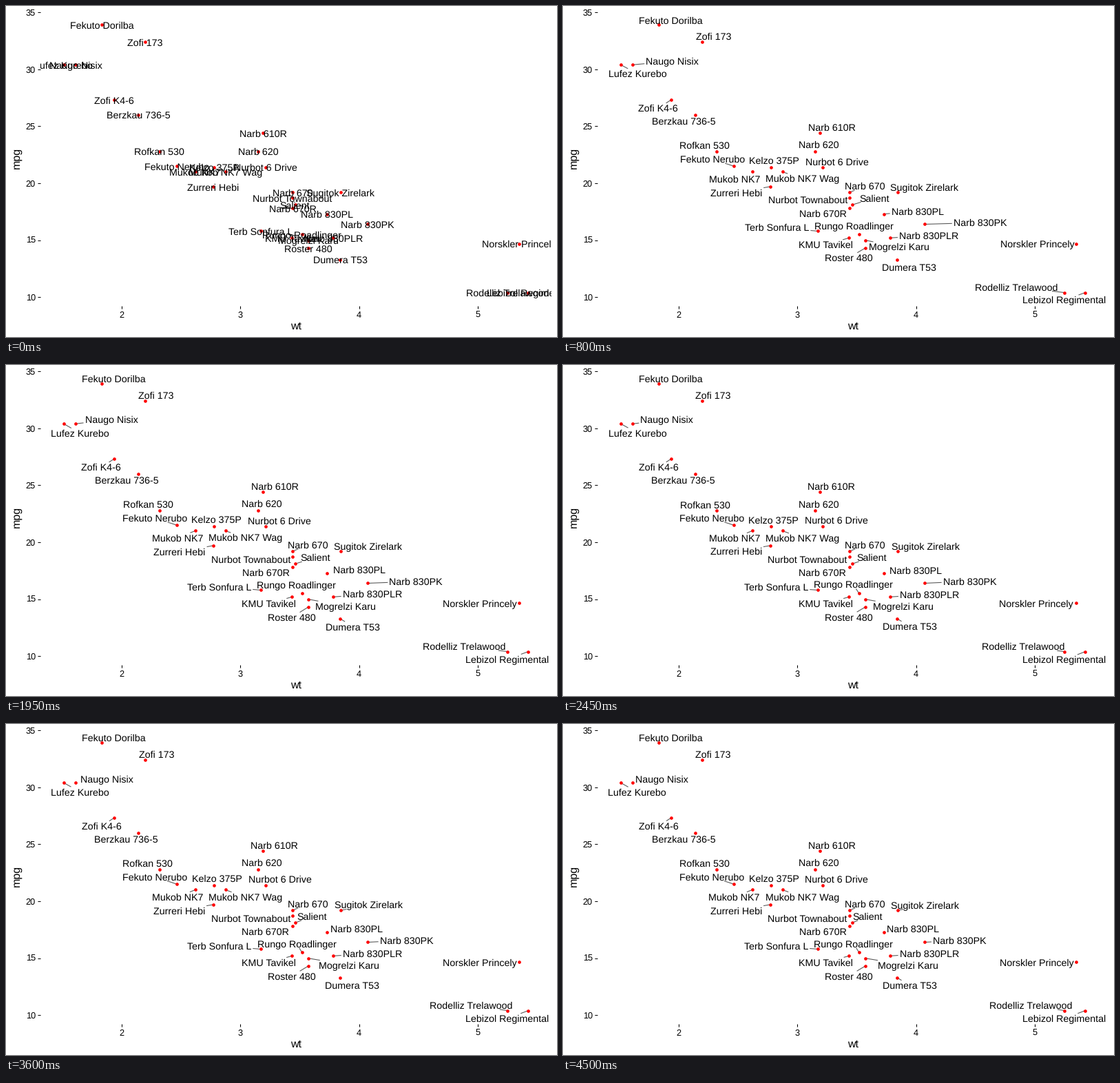
A matplotlib script that plays this animation: 800x480 px, repeating every 5.05 s.

```python
import numpy as np
import matplotlib as mpl
import matplotlib.pyplot as plt
from matplotlib.animation import FuncAnimation
from matplotlib.collections import LineCollection

W, H, DPI = 800, 480, 72
FRAMES, INTERVAL, LAST_MOVE = 101, 50, 90
LEFT, RIGHT, TOP, BOTTOM = 50, 792, 8, 435   # panel edges in pixels

mpl.rcParams.update({"font.family": "Liberation Sans", "text.hinting": "none"})

# name, weight, mileage, resting label offset from the point (right, down)
CARS = [
    ("Fekuto Dorilba", 1.835, 33.9, 17, -8),
    ("Zofi 173", 2.2, 32.4, 16, -9),
    ("Naugo Nisix", 1.615, 30.4, 42, -6),
    ("Lufez Kurebo", 1.513, 30.4, 24, 13),
    ("Zofi K4-6", 1.935, 27.3, -18, 11),
    ("Berzkau 736-5", 2.14, 26, -17, 9),
    ("Narb 610R", 3.19, 24.4, 17, -9),
    ("Rofkan 530", 2.32, 22.8, -17, -9),
    ("Narb 620", 3.15, 22.8, 5, -10),
    ("Fekuto Nerubo", 2.465, 21.5, -32, -11),
    ("Kelzo 375P", 2.78, 21.4, 4, -10),
    ("Nurbot 6 Drive", 3.215, 21.4, 20, -9),
    ("Mukob NK7", 2.62, 21, -26, 10),
    ("Mukob NK7 Wag", 2.875, 21, 29, 10),
    ("Zurreri Hebi", 2.77, 19.7, -49, 8),
    ("Narb 670", 3.44, 19.2, 22, -10),
    ("Sugitok Zirelark", 3.845, 19.2, 40, -8),
    ("Nurbot Townabout", 3.44, 18.7, -61, 3),
    ("Salient", 3.46, 18.1, 23, -10),
    ("Narb 670R", 3.44, 17.8, -39, 7),
    ("Narb 830PL", 3.73, 17.3, 42, -5),
    ("Narb 830PK", 4.07, 16.4, 51, -3),
    ("Rungo Roadlinger", 3.52, 15.5, -8, -13),
    ("Terb Sonfura L", 3.17, 15.8, -60, -5),
    ("Narb 830PLR", 3.78, 15.2, 57, -4),
    ("KMU Tavikel", 3.435, 15.2, -34, 9),
    ("Mogrelzi Karu", 3.57, 15, 62, 10),
    ("Roster 480", 3.57, 14.3, -24, 14),
    ("Dumera T53", 3.84, 13.3, 18, 11),
    ("Norskler Princely", 5.345, 14.7, -57, 1),
    ("Rodelliz Trelawood", 5.25, 10.4, -49, -8),
    ("Lebizol Regimental", 5.424, 10.4, -30, 11),
]
# Sideways overshoot of the labels that take longest to come to rest
OVERSHOOT = {"Naugo Nisix": 20, "Narb 830PK": 38, "Salient": 13,
             "Narb 830PL": 9, "Mogrelzi Karu": -16, "Rodelliz Trelawood": -28}

names, wt, mpg, right, down = zip(*CARS)


def scale(values, data, start, end):
    """Map values to pixels, with a 5 % margin around the data."""
    lo, hi = min(data), max(data)
    pad = 0.05 * (hi - lo)
    share = (np.asarray(values) - lo + pad) / (hi - lo + 2 * pad)
    return start + share * (end - start)


def to_x(values):
    return scale(values, wt, LEFT, RIGHT)


def to_y(values):
    return scale(values, mpg, BOTTOM, TOP)


points = np.column_stack([to_x(wt), to_y(mpg)])
rest = np.column_stack([right, down])
overshoot = np.array([(OVERSHOOT.get(name, 0), 0) for name in names])
rng = np.random.default_rng(4)
speed = rng.uniform(0.2, 0.9, points.shape)
phase = rng.uniform(0, 2 * np.pi, points.shape)

fig = plt.figure(figsize=(W / DPI, H / DPI), dpi=DPI, facecolor="white")
ax = fig.add_axes([LEFT / W, 1 - BOTTOM / H,
                   (RIGHT - LEFT) / W, (BOTTOM - TOP) / H])
ax.set_xlim(LEFT, RIGHT)
ax.set_ylim(BOTTOM, TOP)
ax.spines[:].set_visible(False)
x_ticks, y_ticks = range(2, 6), range(10, 36, 5)
ax.set_xticks(to_x(x_ticks), [str(v) for v in x_ticks])
ax.set_yticks(to_y(y_ticks), [str(v) for v in y_ticks])
ax.tick_params(length=4, width=1.07, pad=3.2, labelsize=12.8)
fig.text(421 / W, 1 - 469 / H, "wt", size=16, ha="center", va="baseline")
fig.text(20 / W, 1 - 220.5 / H, "mpg", size=16, rotation=90,
         rotation_mode="anchor", ha="center", va="baseline")

ax.scatter(*points.T, s=4.7 ** 2, c="red", linewidths=0, zorder=2)
leaders = LineCollection([], colors="#555555", linewidths=1.07, zorder=1)
ax.add_collection(leaders, autolim=False)
labels = [ax.text(x, y, name, size=14.2, ha="center", va="baseline",
                  clip_on=True, zorder=3)
          for name, (x, y) in zip(names, points)]
half = np.array([t.get_window_extent().width / 2 for t in labels]) * DPI / fig.dpi


def centres(i):
    """Label centres: a fast spread, then a slow, fading drift."""
    i = min(i, LAST_MOVE)
    spread = 1 - np.exp(-i / 3.5)
    left = 1 - i / LAST_MOVE
    wobble = 0.8 * left * np.sin(speed * i + phase)
    pos = points + (0, 0.4) + spread * (rest + overshoot * left ** 1.2 + wobble)
    if i > 0:   # labels stay inside the panel once the layout starts
        pos[:, 0] = np.clip(pos[:, 0], LEFT + 2 + half, RIGHT - 3.5 - half)
    return pos


def leader(point, centre, half_width):
    """Line from a point to the edge of its label box, if long enough."""
    dx, dy = centre - point
    reach_y = 7.3 if dy > 0 else 6
    inside = min((half_width + 2) / max(abs(dx), 1e-6),
                 reach_y / max(abs(dy), 1e-6))
    part = 1 - inside
    if part <= 0 or part * np.hypot(dx, dy) < 7.5:
        return None
    return [point, point + part * np.array([dx, dy])]


def draw(i):
    pos = centres(i)
    for text, (x, y) in zip(labels, pos):
        text.set_position((x, y + 5))
    lines = (leader(*item) for item in zip(points, pos, half))
    leaders.set_segments([line for line in lines if line])
    return [leaders, *labels]


anim = FuncAnimation(fig, draw, frames=FRAMES, interval=INTERVAL,
                     repeat=True, repeat_delay=0, blit=False)
plt.show()
```
